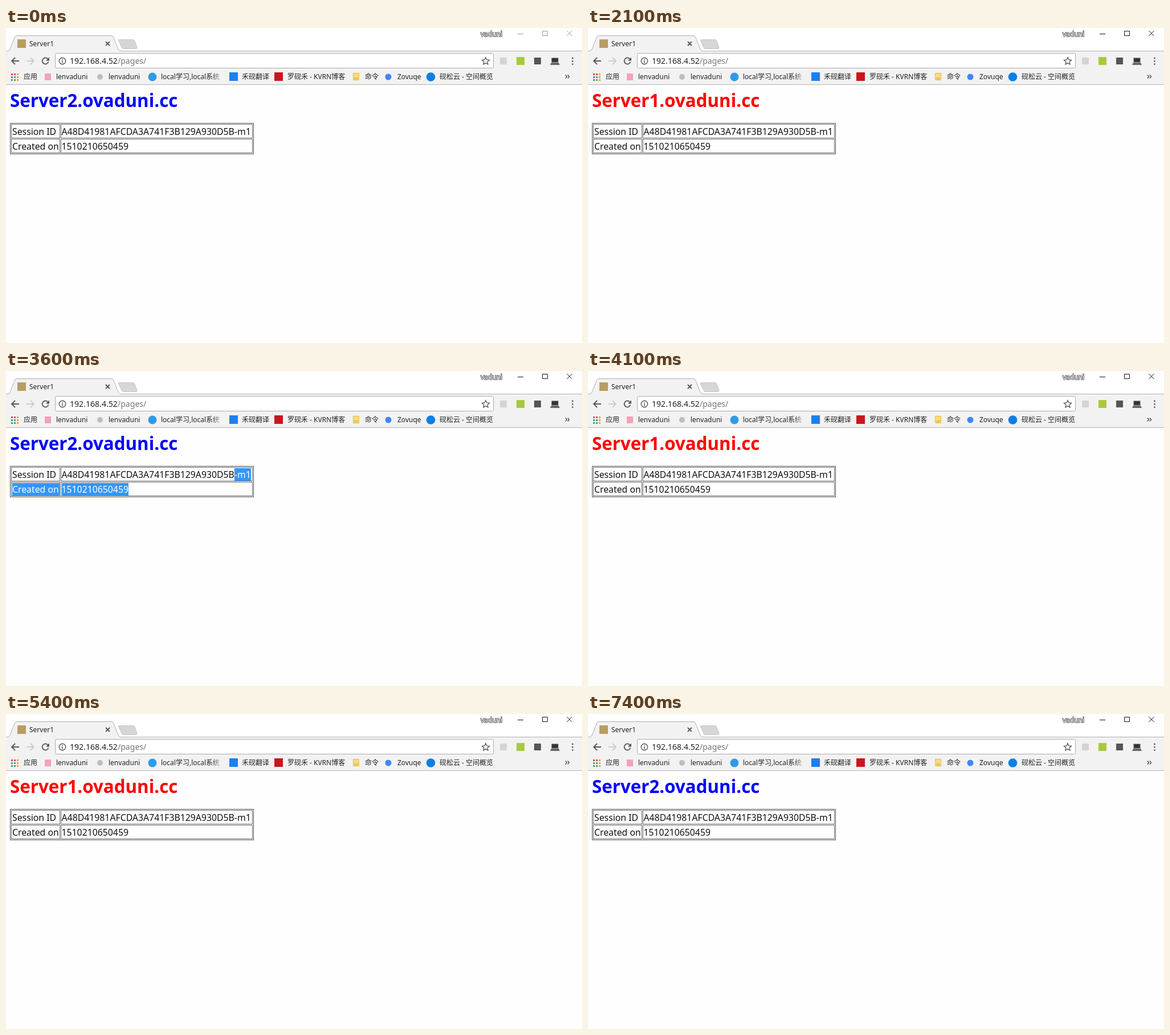
These frames come from a looping animation (1011 by 554 pixels, 8 s). An HTML page:

```html
<!DOCTYPE html>
<html lang="zh-CN">
<head>
<meta charset="utf-8">
<title>Session demo</title>
<style>
html, body { margin: 0; width: 100%; height: 100%; overflow: hidden; background: #fefefe; }
body { position: relative; font-family: "Noto Sans", "Noto Sans CJK SC", sans-serif; }
svg { position: absolute; left: 0; top: 0; }
svg text { font-size: 12px; fill: #222; white-space: pre; }
svg .user { fill: #fff; stroke: #444; stroke-width: 1.5px; paint-order: stroke; stroke-linejoin: round; }
svg .url { font-size: 14.1px; }
svg .title { font-size: 31.3px; font-weight: 700; fill: #00f; }
.red .title { fill: #f00; }
.line { fill: none; stroke: #555; stroke-width: 1.8; }
.buttons { fill: none; stroke: #111; }
.idle .buttons { stroke: #999; }
.spinner { fill: none; stroke: #8a8a8a; stroke-width: 2; visibility: hidden; }
.loading .spinner { visibility: visible; }
.loading .favicon { visibility: hidden; }
.dimmed .laptop { opacity: .45; }
.frame { fill: none; stroke: #555; }
.cell { fill: none; stroke: #6c6c6c; }
.row { position: absolute; font-size: 15.8px; line-height: 21px; white-space: pre; color: #111; }
.all .a, .one .o, .pair .p { background: #3297fd; color: #fff; }
.pad { padding-right: 2px; margin-right: -2px; }
</style>
</head>
<body class="idle">
<svg width="1011" height="554" viewBox="0 0 1011 554">
  <defs>
    <linearGradient id="fade">
      <stop offset="0" stop-color="#f2f2f2" stop-opacity="0"/>
      <stop offset="1" stop-color="#f2f2f2"/>
    </linearGradient>
  </defs>

  <!-- window and tab -->
  <rect width="1011" height="41" fill="#fff"/>
  <rect y="41" width="1011" height="58" fill="#f2f2f2"/>
  <path d="M0 99.5H1011" stroke="#b5b5b5"/>
  <path d="M0 40.5H4Q6 40 7 37L15 17Q16 13.5 19 13.5H185Q188 13.5 189 17L197 37Q198 40.5 201 40.5H1011V42H0Z" fill="#f2f2f2"/>
  <path d="M0 40.5H4Q6 40 7 37L15 17Q16 13.5 19 13.5H185Q188 13.5 189 17L197 37Q198 40.5 201 40.5H1011" fill="none" stroke="#b0b0b4"/>
  <path d="M199 20.5H223Q225 20.5 226 23L230 34Q230 36.5 228 36.5H206Q204 36.5 203 34L197.5 22Q197 20.5 199 20.5Z" fill="#d6d6d6" stroke="#c6c6c6"/>
  <rect class="favicon" x="20" y="20" width="15" height="15" fill="#b99d62"/>
  <path class="spinner" d="M27.5 21.5A6 6 0 1 1 21.5 27.5"/>
  <text x="41" y="31.5">Server1</text>
  <path class="line" d="M175 24L182 31M182 24L175 31"/>
  <text class="user" x="833" y="15">vaduni</text>
  <path class="buttons" d="M898 10.5H908M941.5 5.5H950.5V13.5H941.5ZM984.5 5L993.5 14M993.5 5L984.5 14"/>

  <!-- toolbar -->
  <path class="line" d="M23 58H10.5M16 52L10 58L16 64"/>
  <path class="line" d="M36 58H48.5M43 52L49 58L43 64" style="stroke:#ccc"/>
  <path class="line" d="M73.5 54.5A5.5 5.5 0 1 0 74.5 59.5"/>
  <path d="M76 51.5V57.5H70Z" fill="#555"/>
  <rect x="86.5" y="44.5" width="769" height="26" rx="2" fill="#fff" stroke="#ababab"/>
  <circle cx="99" cy="58" r="5.7" fill="none" stroke="#555" stroke-width="1.4"/>
  <path d="M99 57V61.5M99 54.5V56" stroke="#555" stroke-width="1.5"/>
  <text class="url" x="112" y="63">192.168.4.52<tspan fill="#777">/pages/</tspan></text>
  <path d="M842 51.7L843.9 56L848.5 56.4L845 59.5L846 64L842 61.6L838 64L839 59.5L835.5 56.4L840.1 56Z" fill="none" stroke="#555" stroke-width="1.3"/>
  <rect x="867" y="52" width="12" height="12" fill="#d4d4d4"/>
  <rect x="896" y="51" width="14" height="14" fill="#a9c93c"/>
  <rect x="927" y="52" width="12" height="12" fill="#555"/>
  <g class="laptop">
    <rect x="958" y="53" width="11" height="7" fill="#333" stroke="#555"/>
    <path d="M957 61H970L972 65H955Z" fill="#666"/>
  </g>
  <path d="M994.5 53h0M994.5 58.3h0M994.5 63.6h0" stroke="#555" stroke-width="2.8" stroke-linecap="round"/>

  <!-- bookmarks -->
  <g id="apps"></g>
  <text x="31" y="90">应用</text>
  <rect x="68" y="80" width="11" height="12" fill="#f3a3b5"/>
  <text x="88" y="90">lenvaduni</text>
  <circle cx="165" cy="86" r="5" fill="#bdbdbd"/>
  <text x="180" y="90">lenvaduni</text>
  <circle cx="257" cy="86" r="7.5" fill="#2f9be6"/>
  <text x="272" y="90">local学习,local系统</text>
  <rect x="362" y="76" width="18" height="19" fill="url(#fade)"/>
  <rect x="392" y="78" width="15" height="15" fill="#1e7fee"/>
  <text x="414" y="90">禾砚翻译</text>
  <rect x="471" y="78" width="15" height="15" fill="#c9161d"/>
  <text x="494" y="90">罗砚禾 - KVRN博客</text>
  <path d="M609.5 79.5H619.5V91.5H609.5Z" fill="#f8dc77" stroke="#e2bd4c"/>
  <path d="M611 87.5H618M611 89.5H618" stroke="#d9b148"/>
  <text x="630" y="90">命令</text>
  <circle cx="671" cy="86" r="5.5" fill="#4285f4"/>
  <text x="687" y="90">Zovuqe</text>
  <circle cx="745.5" cy="86" r="7.8" fill="#0b7fe6"/>
  <text x="761" y="90">砚松云 - 空间概览</text>
  <path d="M982 82.5L984.5 85.5L982 88.5M986 82.5L988.5 85.5L986 88.5" fill="none" stroke="#444" stroke-width="1.3"/>

  <!-- page -->
  <text class="title" id="title" x="7" y="139">Server2.ovaduni.cc</text>
  <rect class="frame" x="7.5" y="167.5" width="427" height="54"/>
  <g class="cell">
    <rect x="9.5" y="169.5" width="85" height="24"/>
    <rect x="96.5" y="169.5" width="336" height="24"/>
    <rect x="9.5" y="195.5" width="85" height="24"/>
    <rect x="96.5" y="195.5" width="336" height="24"/>
  </g>
</svg>
<div class="row" style="left:11px;top:172px">Session ID</div>
<div class="row" style="left:97.5px;top:172px">A48D41981AFCDA3A741F3B129A930D5B<span class="a">-</span><span class="a p">m</span><span class="a p o">1</span></div>
<div class="row" style="left:11px;top:198px"><span class="a pad">Created on</span></div>
<div class="row" style="left:97.5px;top:198px"><span class="a">1510210650459</span></div>
<script>
const LOOP = 8000;
// The page flips between the two servers at each of these times.
const flips = [
  1600, 1700, 1800, 1900, 2100, 2200, 2300, 2400, 2600, 2800, 3200, 3400,
  3700, 3900, 4100, 4300, 4500, 4600, 4700, 4800, 4900, 5000, 5100, 5200,
  5400, 5500, 5600, 5800, 6000, 6500
];
const title = document.getElementById("title");
const within = (t, a, b) => t >= a && t < b;

const colors = ["#e2483d", "#e2483d", "#f0a030", "#3aa757", "#4a86e8", "#f0a030", "#3aa757", "#3aa757", "#f0a030"];
document.getElementById("apps").innerHTML = colors.map((c, i) =>
  `<rect x="${9 + i % 3 * 5}" y="${80 + Math.floor(i / 3) * 5}" width="3" height="3" fill="${c}"/>`).join("");

function stateAt(t) {
  const dimmed = within(t, 2000, 2100) || within(t, 5000, 5100);
  return {
    idle: t < 200,
    red: flips.filter(f => f <= t).length % 2 === 1,
    loading: dimmed || within(t, 5900, 6000),
    dimmed,
    all: within(t, 3600, 3700),
    one: within(t, 6900, 7000),
    pair: within(t, 7000, 7400)
  };
}

let shown = "";
function draw() {
  const state = stateAt(performance.now() % LOOP);
  const names = Object.keys(state).filter(k => state[k]).join(" ");
  if (names !== shown) {
    document.body.className = shown = names;
    title.textContent = `Server${state.red ? 1 : 2}.ovaduni.cc`;
  }
  requestAnimationFrame(draw);
}
draw();
</script>
</body>
</html>
```
